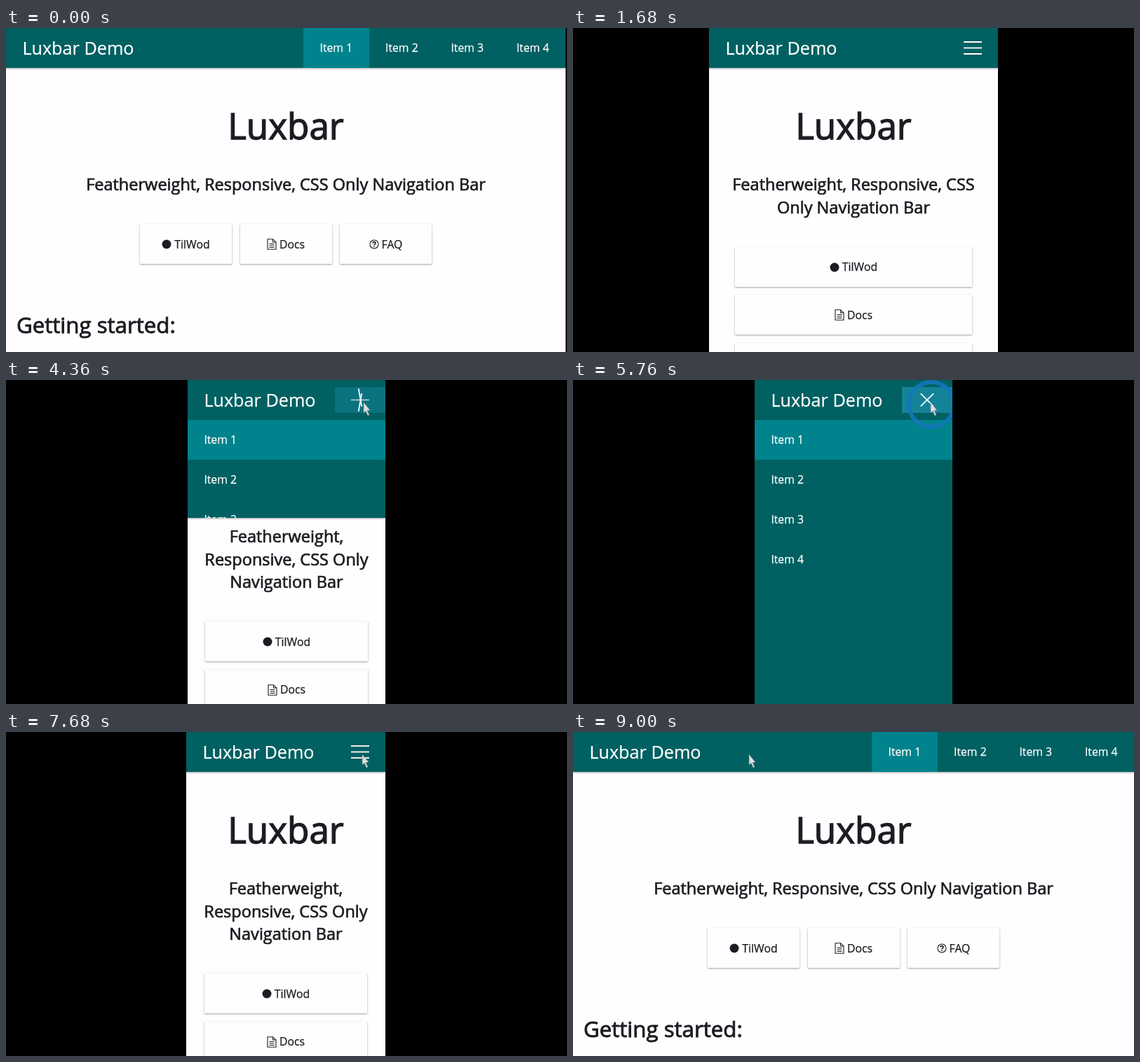
These frames come from a looping animation (800x463 px, 9040 ms). An HTML page:

```html
<!DOCTYPE html>
<html lang="en">
<head>
<meta charset="utf-8">
<title>Luxbar Demo</title>
<style>
* { box-sizing: border-box; margin: 0; padding: 0; }
html, body { width: 100%; height: 100%; overflow: hidden; background: #000; }
body { font: 15.8px/57px "Open Sans", sans-serif; color: #1d1c20; -webkit-text-stroke: .25px; }
#page { position: absolute; top: 0; height: 463px; overflow: hidden; background: #fffdff; }
h1, h2, h3 { font-weight: 400; -webkit-text-stroke: .7px; }
h1 { margin-top: 108.8px; font-size: 51.2px; line-height: 60px; text-align: center; -webkit-text-stroke-width: 1.3px; }
h2 { margin-top: 38.7px; font-size: 23.53px; line-height: 32.5px; text-align: center; }
h3 { margin-top: 66.5px; font-size: 31.25px; line-height: 40px; white-space: nowrap; -webkit-text-stroke-width: .9px; }
main { padding: 0 15px; }
.buttons { display: flex; justify-content: center; gap: 11.5px; margin: 40.5px -15px 0; }
.buttons a { display: flex; align-items: center; justify-content: center; gap: 4px; width: 131px; height: 57px; padding-top: 1px; }
.buttons a, header { box-shadow: 0 1px 3px rgba(0,0,0,.14), 0 1px 2px rgba(0,0,0,.26); }
.stacked .buttons { flex-direction: column; align-items: center; }
.stacked .buttons a { width: 82%; }
.buttons svg { width: 14px; height: 16px; fill: none; stroke: #1d1c20; stroke-width: 1.1; }
header { position: absolute; top: 0; left: 0; width: 100%; overflow: hidden; background: #006062; color: #fff; white-space: nowrap; }
.brand { padding-left: 23.4px; height: 57px; font-size: 25.2px; }
nav { position: absolute; top: 0; right: 0; display: flex; }
nav a { padding: 0 23.4px; }
nav a:first-child { background: #00838c; }
.small nav { top: 57px; left: 0; flex-direction: column; }
#icon { display: none; position: absolute; right: 0; top: 0; width: 72px; height: 57px; stroke: #fff; stroke-width: 1.8; }
.small #icon { display: block; }
#pointer { position: absolute; left: 0; top: 0; width: 300px; height: 80px; }
</style>
</head>
<body>
<div id="page">
  <main>
    <h1>Luxbar</h1>
    <h2>Featherweight, Responsive, CSS Only Navigation Bar</h2>
    <div class="buttons">
      <a><svg viewBox="0 0 14 16"><circle cx="7" cy="8" r="6.5" fill="#1d1c20" stroke="none"/></svg>TilWod</a>
      <a><svg viewBox="0 0 14 16"><path d="M1 .7H8.5L13 5V15.3H1ZM8.5 .7V5H13M3.5 7.5H10.5M3.5 10H10.5M3.5 12.5H10.5"/></svg>Docs</a>
      <a><svg viewBox="0 0 14 16"><circle cx="7" cy="8" r="6"/><path stroke-width="1.6" d="M4.8 6.5C5 4 9.2 4.1 9.1 6.5C9 7.8 7 7.8 7 9.3M7 10.3V11.8"/></svg>FAQ</a>
    </div>
    <h3>Getting started:</h3>
  </main>
  <header id="bar">
    <div class="brand">Luxbar Demo</div>
    <nav><a>Item 1</a><a>Item 2</a><a>Item 3</a><a>Item 4</a></nav>
    <svg id="icon">
      <rect id="tap" y="10" width="72" height="37" fill="#33b5e5" stroke="none"/>
      <path id="top" d="M-13 0H13"/><path id="mid" d="M-13 0H13"/><path id="low" d="M-13 0H13"/>
    </svg>
  </header>
  <svg id="pointer">
    <circle id="ring" cx="252" cy="35" fill="none" stroke="#1277ba" stroke-width="6"/>
    <path d="M251 32v15l3-2.500 3 6.500 2-1-2.800-6.500 4-.3z" fill="#ddd" stroke="#6d8083" stroke-width=".6"/>
  </svg>
</div>
<script>
const LOOP = 9040, STEP = 40, BAR = 57, HEIGHT = 463;
const OPEN = 4240, CLOSE = 6040;
// Window drags: first step, last step, left and right edge reached
const drags = [
  [320, 440, 7, 792], [680, 760, 53, 745], [1000, 1080, 102, 698], [1240, 1240, 117, 681],
  [1400, 1520, 170, 628], [1680, 1680, 194, 606], [1720, 1840, 217, 581], [2000, 2000, 231, 567],
  [2200, 2400, 259, 541], [7680, 7680, 257, 541], [7760, 8480, 35, 765], [8680, 9000, 0, 800]
];
const el = id => document.getElementById(id);
const [page, bar, tap, topLine, mid, low, pointer, ring] =
  ["page", "bar", "tap", "top", "mid", "low", "pointer", "ring"].map(el);
const clamp = x => Math.max(0, Math.min(1, x));

// CSS "ease" curve
function ease(x) {
  let a = 0, b = 1, s;
  for (let i = 0; i < 20; i++) {
    s = (a + b) / 2;
    if (.75 * s * (1 - s) + s ** 3 < x) a = s; else b = s;
  }
  return .3 * s * (1 - s) ** 2 + 3 * s * s * (1 - s) + s ** 3;
}

// 0 when the menu is closed, 1 when it is open
const toggle = (t, duration) => t < CLOSE
  ? ease(clamp((t - OPEN) / duration))
  : 1 - ease(clamp((t - CLOSE) / duration));

function edges(t) {
  let l = 0, r = 798;
  for (const [from, to, nl, nr] of drags) {
    if (t < from) break;
    const k = clamp((t - from + STEP) / (to - from + STEP));
    l += (nl - l) * k;
    r += (nr - r) * k;
  }
  return [Math.round(l), Math.round(r)];
}

function place(line, y, angle) {
  line.setAttribute("transform", `translate(36 ${y}) rotate(${angle})`);
}

function draw(t) {
  const [l, r] = edges(t), width = r - l;
  page.style.left = l + "px";
  page.style.width = width + "px";
  page.classList.toggle("small", width < 750);
  page.classList.toggle("stacked", width < 600);

  bar.style.height = BAR + (HEIGHT - BAR) * toggle(t, 540) + "px";
  const p = toggle(t, 350), gap = 8.5 * (1 - p);
  place(topLine, 28.5 - gap, 135 * p);
  place(mid, 28.5, 0);
  place(low, 28.5 + gap, -135 * p);
  mid.style.opacity = 1 - p * p;

  pointer.style.display = t < 4200 ? "none" : "block";
  const press = t < 5760 ? 4200 : 5760;
  const release = t < 5760 ? OPEN : CLOSE;
  const k = clamp((t - press) / 160);
  ring.setAttribute("r", 32 - 8 * k);
  ring.style.opacity = .9 * (1 - k);
  tap.style.opacity = t < press ? 0 : .4 * (1 - clamp((t - release) / 260));
}

function tick(now) {
  draw(Math.floor(now % LOOP / STEP) * STEP);
  requestAnimationFrame(tick);
}
draw(0);
requestAnimationFrame(tick);
</script>
</body>
</html>
```
